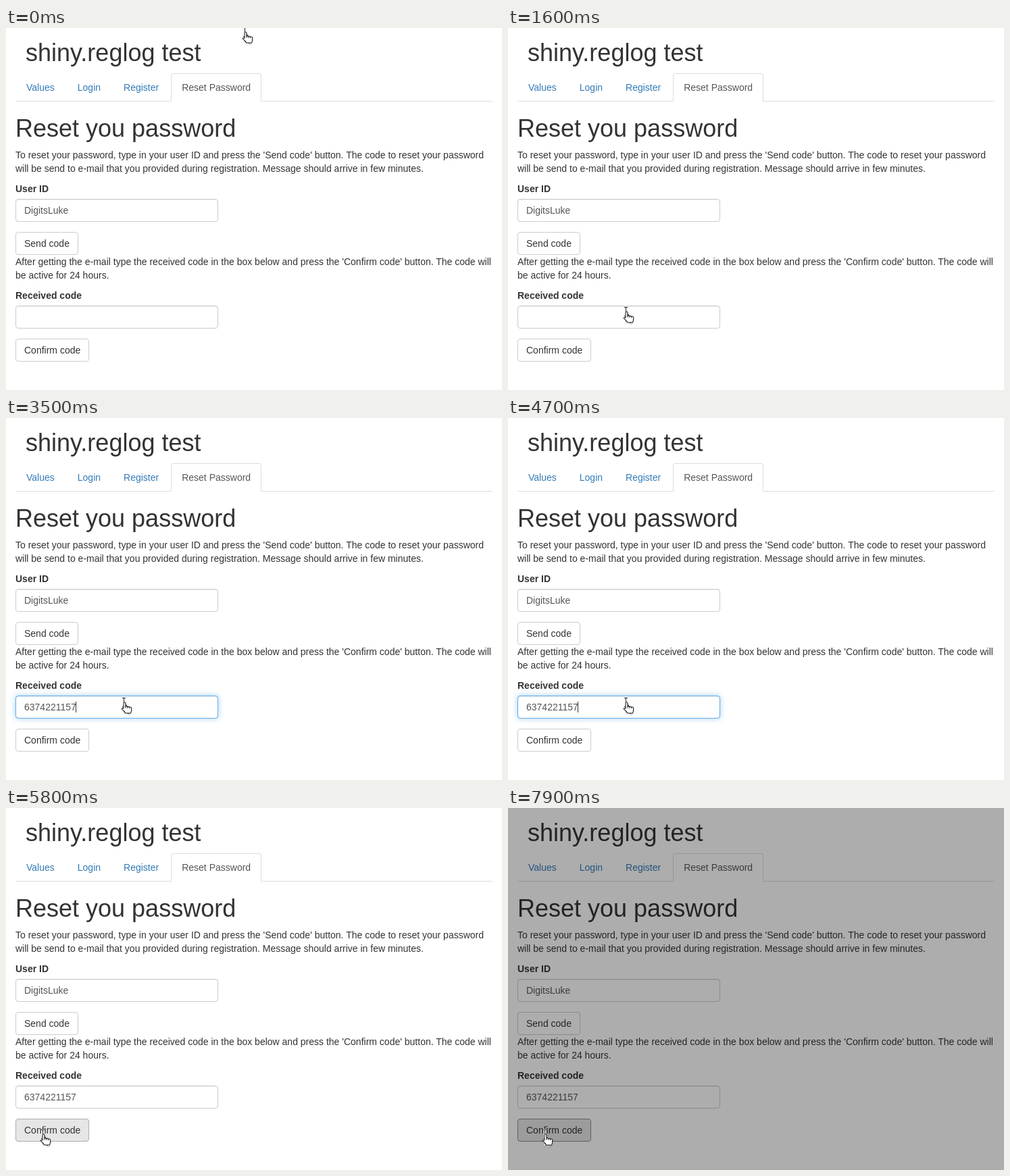
Animation of 734x536 px, one loop 8000 ms. Source, as an HTML page:

```html
<!DOCTYPE html>
<html lang="en">
<head>
<meta charset="utf-8">
<title>Reset password form</title>
<style>
  * { box-sizing: border-box; }
  html, body { margin: 0; width: 100%; height: 100%; overflow: hidden; }
  body {
    position: relative;
    background: #fff;
    color: #333;
    font: 14px/20px "Liberation Sans", Arial, sans-serif;
    white-space: nowrap;
  }
  main { width: 734px; height: 536px; padding: 17px 14px 0; }
  h1, h2 { font-size: 36px; font-weight: 500; line-height: 1.1; }
  h1 { margin: 0 15px 10px; }
  h2 { margin: 20px 0 10px; }
  p { margin: 0 0 10px; }

  nav { display: flex; gap: 2px; border-bottom: 1px solid #ddd; }
  nav span {
    padding: 10px 15px;
    margin-bottom: -1px;
    border: 1px solid transparent;
    border-radius: 4px 4px 0 0;
    color: #337ab7;
  }
  nav .on { color: #555; background: #fff; border-color: #ddd #ddd transparent; }

  label { display: block; margin-bottom: 5px; font-weight: 700; }
  .field, .btn {
    height: 34px;
    padding: 6px 12px;
    border: 1px solid #ccc;
    border-radius: 4px;
    background: #fff;
  }
  .field {
    position: relative;
    width: 300px;
    margin-bottom: 15px;
    color: #555;
    box-shadow: inset 0 1px 1px rgba(0, 0, 0, .075);
  }
  .btn { width: fit-content; }

  /* every animated part shares one 8 s clock with hard steps */
  .code::after, .code span, .caret, .confirm, .shade, .cursor, .cursor g {
    animation: 8s step-end infinite;
  }
  .code::after {
    content: "";
    position: absolute;
    inset: -1px;
    border: 1px solid #66afe9;
    border-radius: 4px;
    box-shadow: 0 0 8px rgba(102, 175, 233, .6);
    animation-name: glow;
  }
  .code span { animation-name: paste; }
  .caret {
    position: absolute;
    left: 12px;
    top: 8px;
    width: 1px;
    height: 16px;
    background: #333;
    animation-name: caret;
  }
  .confirm { animation-name: press; }
  .shade { position: absolute; inset: 0; background: #000; animation-name: shade; }
  .cursor {
    position: absolute;
    left: 0;
    top: 0;
    width: 1px;
    height: 1px;
    overflow: visible;
    animation-name: move;
  }
  .arrow { animation-name: arrow; filter: drop-shadow(1px 1px 1px rgba(0, 0, 0, .25)); }
  .beam { animation-name: beam; }
  .hand { animation-name: hand; }

  @keyframes glow {
    0% { opacity: 0; }
    25% { opacity: .2; }
    26.25% { opacity: .85; }
    27.5% { opacity: 1; }
    71.25% { opacity: .4; }
    72.5%, 100% { opacity: 0; }
  }
  @keyframes paste {
    0% { opacity: 0; }
    43.75%, 100% { opacity: 1; }
  }
  @keyframes caret {
    0% { opacity: 0; }
    26.25% { opacity: 1; }
    32.5% { opacity: 0; }
    40% { opacity: 1; transform: none; }
    43.75% { opacity: 1; transform: translateX(76px); }
    51.25% { opacity: 0; transform: translateX(76px); }
    58.75% { opacity: 1; transform: translateX(76px); }
    66.25%, 100% { opacity: 0; transform: translateX(76px); }
  }
  @keyframes press {
    0% { background: #fff; border-color: #ccc; }
    63.75% { background: #e6e6e6; border-color: #adadad; box-shadow: none; }
    71.25% {
      background: #d4d4d4;
      border-color: #8c8c8c;
      box-shadow: inset 0 3px 5px rgba(0, 0, 0, .125);
    }
    72.5% { background: #e6e6e6; border-color: #adadad; box-shadow: none; }
    97.5%, 100% { background: #e6e6e6; border-color: #8c8c8c; box-shadow: none; }
  }
  @keyframes shade {
    0% { opacity: 0; }
    97.5% { opacity: .055; }
    98.75%, 100% { opacity: .32; }
  }
  @keyframes move {
    0% { transform: translate(353px, 6px); }
    3.75% { transform: translate(353px, 8px); }
    12.5% { transform: translate(325px, 80px); }
    13.75% { transform: translate(230px, 292px); }
    15% { transform: translate(175px, 420px); }
    18.75% { transform: translate(175px, 402px); }
    20% { transform: translate(174px, 420px); }
    25% { transform: translate(174px, 419px); }
    31.25% { transform: translate(174px, 420px); }
    32.5% { transform: translate(174px, 421px); }
    60% { transform: translate(168px, 424px); }
    61.25% { transform: translate(150px, 434px); }
    62.5% { transform: translate(120px, 449px); }
    63.75% { transform: translate(86px, 468px); }
    65% { transform: translate(64px, 480px); }
    66.25% { transform: translate(55px, 484px); }
    67.5% { transform: translate(54px, 483px); }
    97.5% { transform: translate(53px, 483px); }
    98.75%, 100% { transform: translate(54px, 483px); }
  }
  @keyframes arrow {
    0%, 18.75%, 62.5%, 97.5%, 100% { opacity: 1; }
    15%, 20%, 63.75% { opacity: 0; }
  }
  @keyframes beam {
    0%, 18.75%, 62.5%, 100% { opacity: 0; }
    15%, 20% { opacity: 1; }
  }
  @keyframes hand {
    0%, 97.5%, 100% { opacity: 0; }
    63.75% { opacity: 1; }
  }
</style>
</head>
<body>
<main>
  <h1>shiny.reglog test</h1>
  <nav>
    <span>Values</span><span>Login</span><span>Register</span><span class="on">Reset Password</span>
  </nav>
  <h2>Reset you password</h2>
  <p>To reset your password, type in your user ID and press the 'Send code' button. The code to reset your password<br>
    will be send to e-mail that you provided during registration. Message should arrive in few minutes.</p>
  <label>User ID</label>
  <div class="field">DigitsLuke</div>
  <div class="btn">Send code</div>
  <p>After getting the e-mail type the received code in the box below and press the 'Confirm code' button. The code will<br>
    be active for 24 hours.</p>
  <label>Received code</label>
  <div class="field code"><span>6374221157</span><i class="caret"></i></div>
  <div class="btn confirm">Confirm code</div>
</main>
<div class="shade"></div>
<svg class="cursor">
  <g class="arrow">
    <path d="M.5 0V15.2L4 12 6.3 17.2 8.6 16.2 6.3 11.2H10.8Z" fill="#1c1c1c" stroke="#fff" stroke-width="1.6" paint-order="stroke"/>
  </g>
  <g class="beam" fill="none">
    <path id="stem" d="M-2 -6.5H3M.5 -6.5V6.5M-2 6.5H3" stroke="#fff" stroke-width="3" stroke-opacity=".8"/>
    <use href="#stem"/>
    <path d="M-2 -6.5H3M.5 -6.5V6.5M-2 6.5H3" stroke="#222"/>
  </g>
  <g class="hand">
    <path transform="translate(1 .5)" fill="#fff" stroke="#222" stroke-width="1.1" stroke-linejoin="round"
      d="M-1 1.2Q-1 -.5 .5 -.5T2 1.2V5.5Q4 4.6 4.8 6 6.6 5.2 7.5 6.6 10.5 6 10.6 8.5V11Q10.5 13 9.5 15.5H2Q0 12.5 -3.6 9.3 -4 7.4 -1 8.6ZM2 5.5V8M4.8 6V8.2M7.5 6.6V8.6"/>
  </g>
</svg>
</body>
</html>
```
